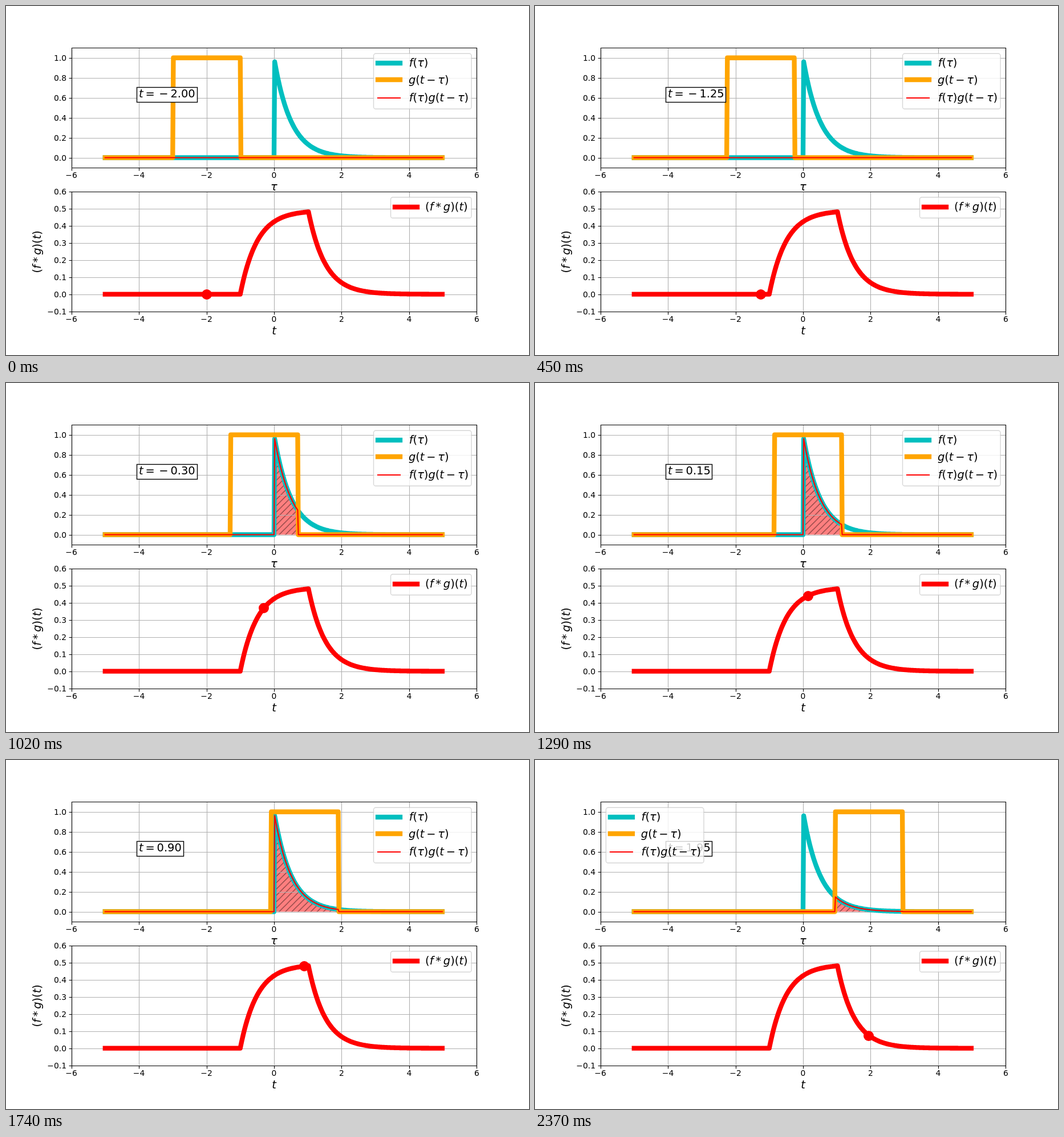
An HTML page for the animation above (2.4 s loop, 917 by 611 pixels).

```html
<!DOCTYPE html>
<html lang="en">
<head>
<meta charset="utf-8">
<title>Convolution</title>
<style>
  html, body { margin: 0; width: 100%; height: 100%; overflow: hidden; background: #fff; }
  svg { display: block; font-family: "DejaVu Sans", sans-serif; }
  .tick { font-size: 13.89px; }
  .math { font-size: 19.44px; white-space: pre; }
  .it { font-style: oblique; }
  .line { fill: none; stroke-linejoin: round; stroke-linecap: square; }
</style>
</head>
<body>
<svg id="stage" width="917" height="611" viewBox="0 0 917 611">
  <defs>
    <pattern id="hatch" width="11.111" height="11.111" patternUnits="userSpaceOnUse">
      <path d="M-2 13.111L13.111 -2M-2 2L2 -2M9.111 13.111L13.111 9.111" stroke="#000" stroke-opacity=".6" stroke-width="1.1"/>
    </pattern>
  </defs>
</svg>
<script>
const NS = 'http://www.w3.org/2000/svg';
const stage = document.getElementById('stage');
const LEFT = 114.6, RIGHT = 825.3, THICK = 8.33, THIN = 2.08;
const STEP = 30, COUNT = 80;
const CYAN = '#00bfbf', ORANGE = '#ffa500', RED = '#ff0000';

function add(tag, attrs, parent = stage) {
  const el = document.createElementNS(NS, tag);
  for (const k in attrs) el.setAttribute(k, attrs[k]);
  parent.appendChild(el);
  return el;
}

// Thin rules sit on pixel centres.
const snap = v => Math.round(v) + 0.5;
const px = x => LEFT + (x + 6) * (RIGHT - LEFT) / 12;
const minus = s => String(s).replace('-', '\u2212');

const top1 = { top: 73.3, bottom: 283, lo: -0.1, hi: 1.1 };
const low = { top: 324.9, bottom: 534.6, lo: -0.1, hi: 0.6 };
const py = (ax, v) => ax.bottom - (v - ax.lo) / (ax.hi - ax.lo) * (ax.bottom - ax.top);

// Letters are slanted; operators get thin spaces around them.
function setMath(el, str) {
  el.textContent = '';
  let gap = 0;
  for (const ch of str) {
    const op = '=\u2212*'.includes(ch);
    const t = add('tspan', /[a-zτ]/.test(ch) ? { class: 'it' } : {}, el);
    const dx = gap + (op ? 3.8 : 0);
    if (dx) t.setAttribute('dx', dx);
    t.textContent = ch;
    gap = op ? 3.8 : 0;
  }
}

function math(str, x, y, parent, extra = {}) {
  const el = add('text', { class: 'math', x, y, ...extra }, parent);
  setMath(el, str);
  return el;
}

function line(color, width, points = '', parent = stage) {
  return add('polyline', { class: 'line', stroke: color, 'stroke-width': width, points }, parent);
}

function axes(ax, ticks) {
  const grid = [], marks = [];
  for (let x = -6; x <= 6; x += 2) {
    const p = snap(px(x));
    grid.push(`M${p} ${ax.top}V${ax.bottom}`);
    marks.push(`M${p} ${snap(ax.bottom)}v4.9`);
    add('text', { class: 'tick', x: px(x), y: Math.round(ax.bottom + 18.3), 'text-anchor': 'middle' }).textContent = minus(x);
  }
  for (const v of ticks) {
    const p = snap(py(ax, v));
    grid.push(`M${LEFT} ${p}H${RIGHT}`);
    marks.push(`M${snap(LEFT)} ${p}h-4.9`);
    add('text', { class: 'tick', x: 106, y: Math.round(py(ax, v) + 5.1), 'text-anchor': 'end' }).textContent = minus(v.toFixed(1));
  }
  add('path', { d: grid.join(''), stroke: '#b0b0b0', 'stroke-width': 1.11 });
  return () => add('path', {
    d: marks.join('') + `M${snap(LEFT)} ${snap(ax.top)}H${snap(RIGHT)}V${snap(ax.bottom)}H${snap(LEFT)}Z`,
    fill: 'none', stroke: '#000', 'stroke-width': 1.11
  });
}

function legend(x, y, w, h, rows) {
  const g = add('g', {});
  add('rect', { x, y, width: w, height: h, rx: 3.9, fill: '#fff', stroke: '#ccc', 'stroke-width': 1.39, opacity: 0.8 }, g);
  for (const [str, color, width, ly, base, shift] of rows) {
    line(color, width, `${x + 7.5},${ly} ${x + 46.5},${ly}`, g);
    math(str, x + 62.2 + shift, base, g);
  }
  return g;
}

// Times are whole hundredths, so that window edges are exact.
const taus = Array.from({ length: 500 }, (_, k) => 2 * k - 500);
const f = u => u > 0 ? Math.exp(-u / 50) : 0;
const gate = (t, u) => u > t - 100 && u <= t + 100 ? 1 : 0;
const conv = t => taus.reduce((s, u) => s + (Math.abs(u - t) <= 100 ? f(u) : 0), 0) * 0.02;
const plot = (ax, fn) => taus.map(u => `${px(u / 100).toFixed(2)},${py(ax, fn(u)).toFixed(2)}`).join(' ');

const area = add('polygon', { fill: RED, 'fill-opacity': 0.5 });
const hatch = add('polygon', { fill: 'url(#hatch)' });
const frame1 = axes(top1, [0, 0.2, 0.4, 0.6, 0.8, 1]);
line(CYAN, THICK, plot(top1, f));
const gLine = line(ORANGE, THICK);
const prodLine = line(RED, THIN);
frame1();
math('τ', px(0), 323.4, stage, { 'text-anchor': 'middle' });
const box = add('rect', { x: 229.5, y: 142.5, height: 26, fill: '#fff', stroke: '#000', 'stroke-width': 1.39 });
const label = math('', 233, 160.4);
const key = legend(644.5, 83.3, 171.6, 97, [
  ['f(τ)', CYAN, THICK, 100, 106, 0],
  ['g(t\u2212τ)', ORANGE, THICK, 129, 135.6, -0.8],
  ['f(τ)g(t\u2212τ)', RED, THIN, 161, 167, 0]
]);

const frame2 = axes(low, [-0.1, 0, 0.1, 0.2, 0.3, 0.4, 0.5, 0.6]);
line(RED, THICK, plot(low, conv));
const dot = add('circle', { r: 9, fill: RED });
frame2();
math('t', px(0), 575.3, stage, { 'text-anchor': 'middle' });
math('(f*g)(t)', 0, 0, stage, { transform: 'translate(60.6 467.6) rotate(-90)' });
legend(674.5, 334.7, 141.6, 36.6, [['(f*g)(t)', RED, THICK, 352, 358.4, -1.6]]);

function draw(step) {
  const t = 5 * step - 200;
  const prod = plot(top1, u => f(u) * gate(t, u));
  gLine.setAttribute('points', plot(top1, u => gate(t, u)));
  for (const el of [prodLine, area, hatch]) el.setAttribute('points', prod);
  dot.setAttribute('cx', Math.round(px(t / 100)));
  dot.setAttribute('cy', Math.round(py(low, conv(t))));
  const value = (t / 100).toFixed(2);
  setMath(label, 't=' + minus(value));
  box.setAttribute('width', (t < 0 ? 105 : 81) + (value.endsWith('0') ? 1 : 0));
  // The key jumps aside once the window reaches it.
  key.setAttribute('transform', `translate(${t >= 195 ? -520.1 : 0} 0)`);
}

let shown = -1;
function tick() {
  const step = Math.floor(performance.now() / STEP) % COUNT;
  if (step !== shown) draw(shown = step);
  requestAnimationFrame(tick);
}
tick();
</script>
</body>
</html>
```
